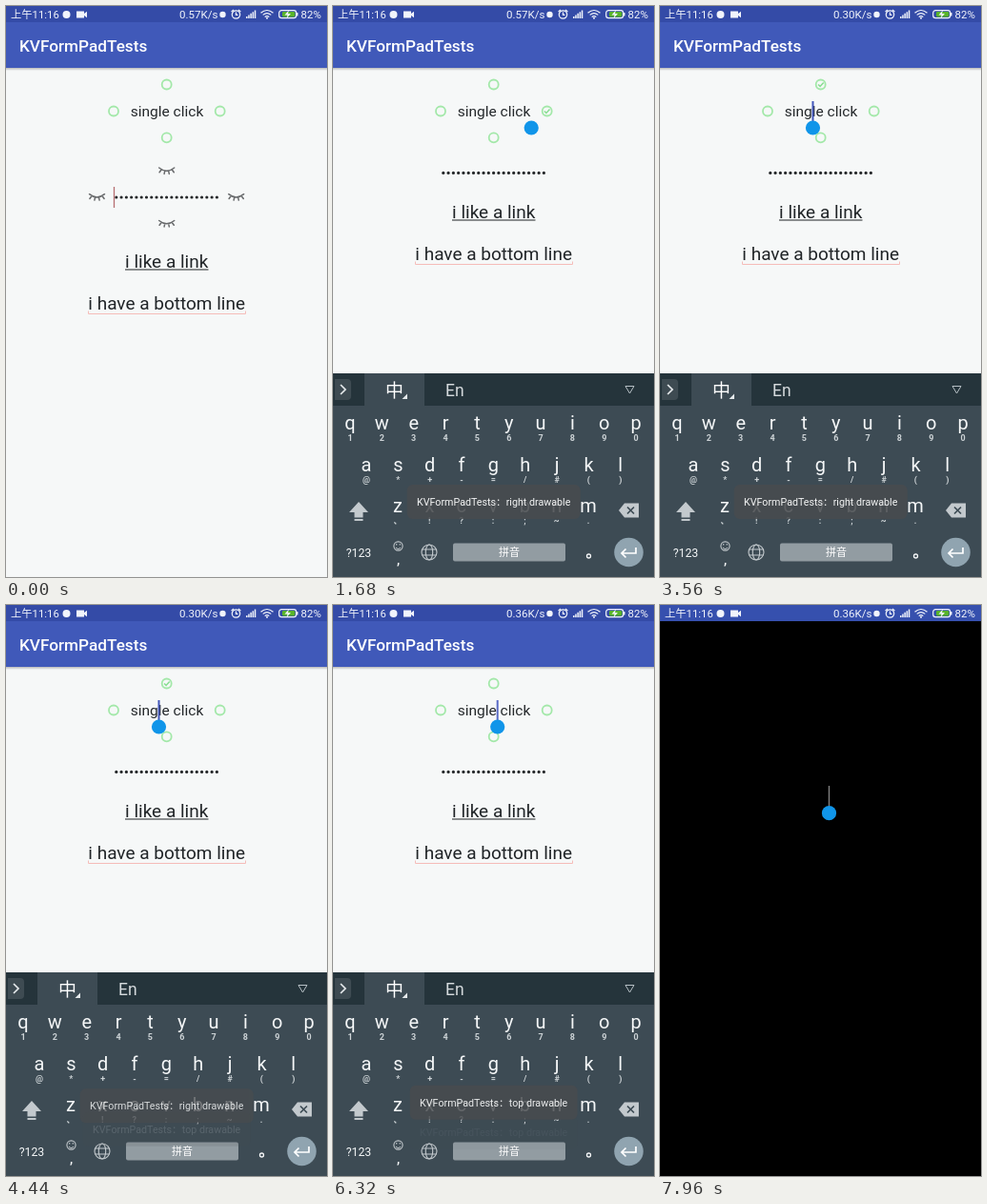
An HTML page that plays this animation: 337x600 px, repeating every 8000 ms.

```html
<!DOCTYPE html>
<html lang="zh-CN">
<head>
<meta charset="utf-8">
<style>
  html, body { margin: 0; width: 100%; height: 100%; overflow: hidden; background: #000; }
  svg { display: block; width: 100%; height: 100%; }
  text { font-family: Roboto, "Noto Sans CJK SC", "Noto Sans CJK", sans-serif; white-space: pre; }
  .mid { text-anchor: middle; }
</style>
</head>
<body>
<svg id="stage" viewBox="0 0 337 600" preserveAspectRatio="none">
  <defs>
    <linearGradient id="shade" x1="0" y1="0" x2="0" y2="1">
      <stop offset="0" stop-color="#000" stop-opacity=".25"/>
      <stop offset="1" stop-color="#000" stop-opacity="0"/>
    </linearGradient>
    <g id="ring" fill="none" stroke="#a3e8a9" stroke-width="1.8"><circle r="5"/></g>
    <path id="lid" fill="none" stroke="#686a6c" stroke-width="1.5" stroke-linecap="round"
      d="M-8-3Q0 3.6 8-3M-5.4-1.2L-7.6 1.8M-1.9 .2L-2.6 3.4M1.9 .2L2.6 3.4M5.4-1.2L7.6 1.8"/>
  </defs>
  <rect width="337" height="600"/>
  <g id="page">
    <rect width="337" height="600" fill="#f6f8f8"/>
    <g id="rings"></g>
    <path id="tick" d="M-2.6 0L-.6 2L3-1.9" fill="none" stroke="#86dd90" stroke-width="1.5"/>
    <text x="169" y="116" class="mid" font-size="15.5" fill="#24282b">single click</text>
    <g id="lids"></g>
    <g id="dots" fill="#25282a"></g>
    <g id="lower" font-size="19" fill="#202427">
      <text x="168.7" y="275" class="mid">i like a link</text>
      <rect x="125" y="276.5" width="87.5" height="1"/>
      <text x="168.7" y="318.7" class="mid">i have a bottom line</text>
      <path d="M86.5 320.5V323.5H251.5V320.5" fill="none" stroke="#f5bcb9"/>
    </g>
    <circle id="touch" cx="204.5" cy="176" r="10" fill="none" stroke="#d3d6d6" stroke-dasharray="1.5 1"/>
  </g>
  <g id="header">
    <rect y="17" width="337" height="48" fill="#4059b9"/>
    <rect y="65" width="337" height="3" fill="url(#shade)"/>
    <text id="title" x="14" y="48" font-size="17.2" font-weight="500" fill="#fff"></text>
  </g>
  <g id="caret">
    <rect id="bar"/>
    <circle id="knob" r="7.6" fill="#1095e9"/>
  </g>
  <g id="keyboard">
    <rect y="386" width="337" height="214" fill="#3d4b54"/>
    <rect y="386" width="337" height="34" fill="#25343b"/>
    <rect x="33" y="386" width="63" height="34" fill="#3d4b54"/>
    <path d="M2 392H15Q19 392 19 396V410Q19 414 15 414H2Z" fill="#3e4b52"/>
    <path d="M8 398L13 403L8 408" fill="none" stroke="#e5e9eb" stroke-width="1.7"/>
    <text x="64.5" y="410.5" class="mid" font-size="19" fill="#fff">中</text>
    <path d="M78 407.5V413H72.5Z" fill="#e5e9eb"/>
    <text x="118" y="409.5" font-size="17.5" fill="#d5dadd">En</text>
    <path d="M307 399.5H316L311.5 407Z" fill="none" stroke="#b7c0c5"/>
    <g id="keys" class="mid" fill="#f4f6f7"></g>
    <path d="M27 521L37 532H31.5V537.5H22.5V532H17Z" fill="#c3c9cd"/>
    <rect x="22.5" y="539" width="9" height="2" fill="#c3c9cd"/>
    <path d="M300 530L306 522.5H321V537.5H306Z" fill="#c3c9cd"/>
    <path d="M309 526.5L316 533.5M316 526.5L309 533.5" stroke="#3d4b54" stroke-width="1.7"/>
    <text x="27" y="578.5" class="mid" font-size="12.3" fill="#f4f6f7">?123</text>
    <g fill="none" stroke="#c3c9cd" stroke-width="1.1">
      <circle cx="68.5" cy="567.5" r="4.6"/>
      <path d="M66 569Q68.5 572 71 569M66.7 565V566.5M70.3 565V566.5"/>
      <circle cx="101" cy="574" r="8"/>
      <ellipse cx="101" cy="574" rx="3.7" ry="8"/>
      <path d="M93.5 571H108.5M93.5 577H108.5"/>
    </g>
    <text x="68.5" y="587" class="mid" font-size="13" font-weight="700" fill="#f4f6f7">,</text>
    <rect x="126" y="564.5" width="118" height="19" rx="2" fill="#929ca2"/>
    <text x="185" y="578" class="mid" font-size="11" fill="#fff">拼音</text>
    <circle cx="268.5" cy="578" r="2" fill="none" stroke="#f4f6f7" stroke-width="1.3"/>
    <circle cx="310.5" cy="574" r="15.3" fill="#90a4b0"/>
    <path d="M318 569V575H303.5M307.5 570.5L303 575L307.5 579.5" fill="none" stroke="#fff" stroke-width="1.7"/>
  </g>
  <g id="toasts"></g>
  <g id="status" fill="#f1f4fb">
    <rect id="statusBg" width="337" height="17"/>
    <text x="5" y="13" font-size="11.3">上午11:16</text>
    <circle cx="63.5" cy="9" r="4"/>
    <path d="M74 5.5H82V8L85 5.8V12.2L82 10V12.5H74Z"/>
    <text id="speed" x="182" y="13" font-size="11.5"></text>
    <circle cx="227.5" cy="9" r="3.2"/>
    <g fill="none" stroke="#f1f4fb" stroke-width="1.2">
      <circle cx="241.5" cy="9" r="4.2"/>
      <path d="M241.5 6.5V9.3H243.5M236.6 6L239 4M246.4 6L244 4"/>
      <path d="M267.5 7.2Q274 1.8 280.5 7.2M269.7 9.4Q274 6 278.3 9.4M271.7 11.4Q274 9.8 276.3 11.4"/>
      <rect x="286.7" y="4.7" width="18" height="8" rx="2.6"/>
    </g>
    <circle cx="274" cy="12.7" r="1"/>
    <path id="signal"/>
    <rect x="290" y="6" width="13.4" height="5.4" rx="1.3" fill="#58b32a"/>
    <path d="M297 4.5L292.5 9.5H295.5L294.5 13L299 8H296Z"/>
    <rect x="305" y="7" width="1.5" height="3.4"/>
    <text x="309.5" y="13" font-size="11.5">82%</text>
  </g>
</svg>
<script>
const LOOP = 8000, SHIFT = 52, NAME = "KVFormPadTests";
const $ = id => document.getElementById(id);

function add(parent, tag, attrs, text) {
  const el = document.createElementNS("http://www.w3.org/2000/svg", tag);
  set(el, attrs);
  if (text) el.textContent = text;
  parent.appendChild(el);
  return el;
}
function set(el, attrs) {
  for (const k in attrs) el.setAttribute(k, attrs[k]);
}
function show(el, on) {
  el.style.display = on ? "" : "none";
}

// Static parts
$("title").textContent = NAME;
for (const [x, y] of [[168.7, 82.5], [113, 110.5], [224.7, 110.5], [168.7, 138.3]])
  add($("rings"), "use", { href: "#ring", x, y });
for (const [x, y] of [[168.7, 173], [95.5, 200.7], [241.7, 200.7], [168.7, 228.5]])
  add($("lids"), "use", { href: "#lid", x, y });
for (let i = 0; i < 21; i++)
  add($("dots"), "circle", { cx: 115.8 + 5.28 * i, cy: 201, r: 1.6 });

const rows = [
  [18, 445, "qwertyuiop", "1234567890"],
  [35, 489, "asdfghjkl", "@*+-=/#()"],
  [68, 532, "zxcvbnm", "、!?:;~."]
];
for (const [x0, y, letters, marks] of rows)
  [...letters].forEach((ch, i) => {
    const x = x0 + 33.35 * i;
    add($("keys"), "text", { x, y, "font-size": 20 }, ch);
    add($("keys"), "text", { x, y: y + 11.5, "font-size": 9, "font-weight": 700, fill: "#cdd3d6" }, marks[i]);
  });
$("signal").setAttribute("d", [0, 1, 2, 3, 4].map(i =>
  `M${252 + 2.2 * i} 13v${-2 - 1.6 * i}h1.5v${2 + 1.6 * i}z`).join(""));

// Taps: time, caret x, password focused, ticked ring, caret colour
const taps = [
  { at: 0, x: 113.5, secret: true, color: "#b66e70" },
  { at: 960, x: 208.2, tick: [224.5, 110.5], color: "#1095e9" },
  { at: 1800, x: 208.2, color: "#1095e9" },
  { at: 3400, x: 160.5, tick: [168.7, 82.5], color: "#4356b9" },
  { at: 5300, x: 172.7, color: "#5a6bc6" },
  { at: 7480, x: 177.5, secret: true, color: "#555b55" }
];
const speeds = [[0, "0.57K/s"], [2200, "0.30K/s"], [5600, "0.36K/s"]];
const BODY_OFF = 7640, HEADER_OFF = 7800;

// Toasts: each slides in from below and drops out again
const FADE = 280, DROP = 35;
const toasts = [
  ["right", 1000, 2680], ["right", 2680, 4370], ["top", 4370, 6080], ["top", 6080, 7444]
].map(([side, from, to]) => {
  const el = add($("toasts"), "g", {});
  const w = side === "right" ? 182 : 176;
  add(el, "rect", { x: 168.7 - w / 2, y: 503, width: w, height: 36, rx: 6, fill: "#484c4f", "fill-opacity": .88 });
  add(el, "text", { x: 168.7, y: 525, class: "mid", "font-size": 10.7, fill: "#f4f5f5" },
    `${NAME}：${side} drawable`);
  return { el, from, to };
});

const clamp = v => Math.min(1, Math.max(0, v));
const ease = v => (1 - Math.cos(Math.PI * clamp(v))) / 2;
const last = (list, test) => list.filter(test).pop();

function draw(t) {
  const tap = last(taps, p => p.at <= t);
  const secret = !!tap.secret, black = t >= BODY_OFF;

  show($("page"), !black);
  show($("header"), t < HEADER_OFF);
  set($("lower"), { transform: `translate(0 ${secret ? 0 : -SHIFT})` });
  set($("dots"), { transform: `translate(0 ${secret ? 0 : -25.6})` });
  show($("lids"), secret);
  show($("tick"), tap.tick);
  if (tap.tick) set($("tick"), { transform: `translate(${tap.tick})` });
  show($("touch"), t >= 7480);

  const top = secret ? 190 : 100;
  const thick = secret ? 1.3 : 2;
  set($("bar"), { x: tap.x - thick / 2, y: top, width: thick, height: 22, fill: black ? "#858585" : tap.color });
  show($("bar"), Math.floor((t - tap.at) / 500) % 2 === 0);
  set($("knob"), { cx: tap.x, cy: top + (black ? 28.7 : secret ? 27.7 : 28) });
  show($("knob"), tap.at > 0);

  const rise = clamp((t - 1360) / 240);
  show($("keyboard"), rise > 0 && !black);
  set($("keyboard"), { transform: `translate(0 ${214 * (1 - rise) ** 2})` });

  for (const { el, from, to } of toasts) {
    const e = ease((t - from) / FADE) * (1 - ease((t - to) / FADE));
    show(el, e > 0 && !black);
    set(el, { transform: `translate(0 ${DROP * (1 - e)})`, opacity: e });
  }

  $("speed").textContent = last(speeds, s => s[0] <= t)[1];
  set($("statusBg"), { fill: black ? "#3650ae" : "#344ba7" });
}

function tick() {
  draw(performance.now() % LOOP);
  requestAnimationFrame(tick);
}
tick();
</script>
</body>
</html>
```
